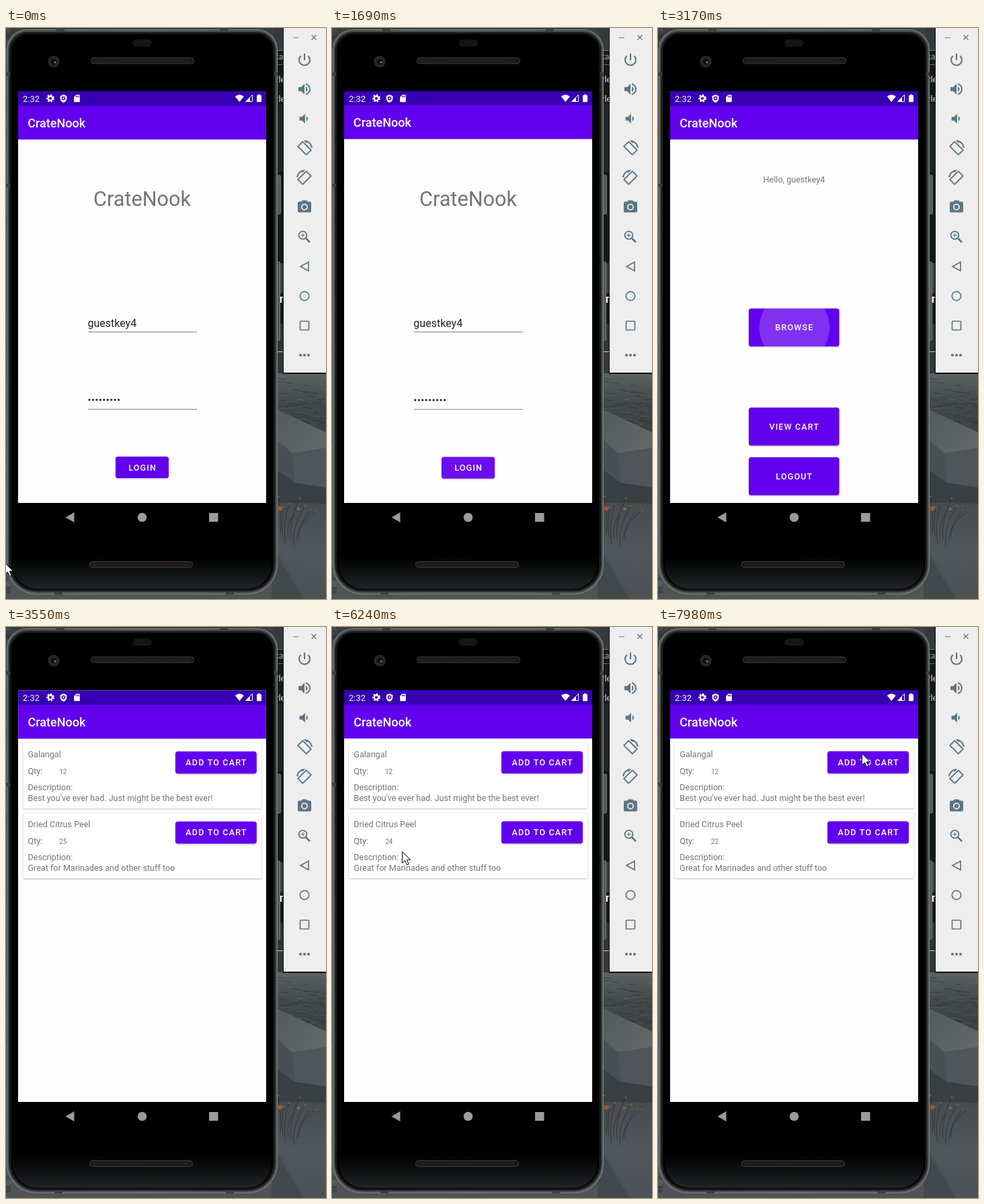
An HTML page with a canvas that plays this animation: 476 by 850 pixels, repeating every 8000 ms.

```html
<!DOCTYPE html>
<html lang="en">
<head>
<meta charset="utf-8">
<title>Phone shop demo</title>
<style>
html, body { margin: 0; width: 100%; height: 100%; overflow: hidden; background: #000; }
canvas { display: block; width: 476px; height: 850px; }
</style>
</head>
<body>
<canvas id="stage"></canvas>
<script>
const W = 476, H = 850, LOOP = 8000;
const APP = 'CrateNook', USER = 'guestkey4';
const PURPLE = '#6200ee', GREY = '#757575', TOOL = '#5c7685';
const SCREEN = { x: 18, y: 94, w: 369, h: 658 };
const dpr = window.devicePixelRatio || 1;

function setup(canvas) {
  canvas.width = W * dpr;
  canvas.height = H * dpr;
  const g = canvas.getContext('2d');
  g.scale(dpr, dpr);
  return g;
}
const stage = setup(document.getElementById('stage'));
const backdrop = document.createElement('canvas');
let c = setup(backdrop);

// ---- helpers ----
function rect(x, y, w, h, fill) {
  c.fillStyle = fill;
  c.fillRect(x, y, w, h);
}
function paint(fill, stroke, lw) {
  if (fill) { c.fillStyle = fill; c.fill(); }
  if (stroke) { c.strokeStyle = stroke; c.lineWidth = lw; c.stroke(); }
}
function round(x, y, w, h, r, fill, stroke, lw = 1) {
  c.beginPath();
  c.roundRect(x, y, w, h, r);
  paint(fill, stroke, lw);
}
function circle(x, y, r, fill, stroke, lw = 1) {
  c.beginPath();
  c.arc(x, y, r, 0, Math.PI * 2);
  paint(fill, stroke, lw);
}
function poly(points, fill, stroke, lw = 1) {
  c.beginPath();
  points.forEach(([x, y]) => c.lineTo(x, y));
  c.closePath();
  paint(fill, stroke, lw);
}
function line(x1, y1, x2, y2, stroke, lw = 1) {
  c.beginPath();
  c.moveTo(x1, y1);
  c.lineTo(x2, y2);
  paint(null, stroke, lw);
}
function text(str, x, y, size, fill, { weight = 400, align = 'left', spacing = 0 } = {}) {
  c.font = `${weight} ${size}px Roboto, sans-serif`;
  c.letterSpacing = spacing + 'px';
  c.textAlign = align;
  c.fillStyle = fill;
  c.fillText(str, x, y);
  c.letterSpacing = '0px';
}
function icon(path, x, y, size, fill, { flip = 1, bold = 0 } = {}) {
  const shape = new Path2D(path);
  c.save();
  c.translate(x, y);
  c.scale(size / 24 * flip, size / 24);
  c.translate(-12, -12);
  c.fillStyle = c.strokeStyle = fill;
  c.fill(shape, 'evenodd');
  if (bold) { c.lineWidth = bold; c.stroke(shape); }
  c.restore();
}
function blend(x1, y1, x2, y2, ...colors) {
  const g = c.createLinearGradient(x1, y1, x2, y2);
  colors.forEach((col, i) => g.addColorStop(i / (colors.length - 1), col));
  return g;
}
function randomizer(seed) {
  return () => (seed = (seed * 16807) % 2147483647) / 2147483647;
}
const clamp = v => Math.max(0, Math.min(1, v));
const smooth = v => v * v * (3 - 2 * v);

// ---- still parts ----
function drawScene() {
  const rnd = randomizer(41);
  rect(0, 0, W, H, blend(0, 0, 0, H, '#3a3e40', '#3e4345', '#464b4e', '#4e5457'));
  for (let i = 0; i < 70; i++) {
    rect(0, rnd() * H, 7, 2 + rnd() * 8, `rgba(${rnd() < .5 ? '15,18,20' : '130,138,142'},.15)`);
  }
  // dark window behind the phone
  rect(398, 0, 16, 484, '#15181a');
  rect(398, 0, 16, 33, '#34393b');
  rect(398, 33, 16, 1, '#777');
  rect(400, 54, 14, 1, '#666');
  rect(404, 114, 10, 100, '#202426');
  text('ka', 400, 47, 12, '#a0a3a5');
  text('rle', 401, 81, 13, '#d0d2d3');
  text('rle', 401, 110, 13, '#d0d2d3');
  rect(404, 350, 10, 45, '#3c4042');
  text('T', 405, 409, 13, '#fff', { weight: 700 });
  rect(402, 440, 12, 40, '#303436');
  rect(402, 481, 12, 1.5, '#b0b3b4');
  rect(402, 483, 12, 32, '#34383a');
  // water
  rect(395, 514, 81, 110, blend(0, 514, 0, 624, '#5c6164', '#464b4e', '#3b4043', '#43494c'));
  for (let i = 0; i < 60; i++) {
    const x = 396 + rnd() * 76, y = 518 + rnd() * 78, w = 6 + rnd() * 18;
    line(x, y, x + w, y + rnd() * 4 - 1, rnd() < .55 ? 'rgba(22,27,30,.3)' : 'rgba(130,137,140,.2)', 1.2);
  }
  // stone block
  rect(395, 630, 81, 220, blend(0, 630, 0, 850, '#3e4447', '#454b4e', '#50565a', '#4c5255'));
  poly([[395, 564], [476, 602], [476, 626], [425, 633], [395, 606]], blend(404, 570, 470, 630, '#54595c', '#63686b'));
  poly([[425, 633], [476, 625], [476, 684], [429, 677]], '#4f5558');
  poly([[395, 606], [425, 633], [429, 677], [395, 652]], '#494f52');
  poly([[395, 652], [429, 677], [476, 684], [476, 708], [395, 706]], '#393f42');
  poly([[395, 782], [406, 784], [446, 850], [395, 850]], '#42484b');
  line(404, 784, 444, 850, '#5c6265', 1);
  // dry plants
  for (let i = 0; i < 8; i++) {
    const x = 405 + i * 8, y = 692 + rnd() * 46, bx = 408 + i * 4, by = 772 - rnd() * 20;
    c.beginPath();
    c.moveTo(bx, by);
    c.quadraticCurveTo(bx - 6 + rnd() * 10, (y + by) / 2, x, y);
    paint(null, 'rgba(40,40,38,.7)', .9);
    circle(x, y, 1 + rnd(), '#70604c');
  }
  circle(408, 715, 3.5, '#a3552f');
  circle(435, 716, 2, '#8a6440');
}

function drawPhone() {
  round(403, 219, 5.5, 58, 2, '#53585a', '#8a8d8e', .7);
  round(402, 348, 5.5, 117, 2, '#53585a', '#8a8d8e', .7);
  round(1.5, 2.5, 402, 840, [30, 30, 44, 44], blend(0, 0, 404, 0, '#4b4f50', '#5b5f60', '#4b4f50'), '#7b8081', 1.2);
  round(4.5, 6, 396, 833, [27, 27, 41, 41], '#191b1b', '#2c2f30');
  round(7.5, 9, 390, 827, [25, 25, 38, 38], '#000');
  round(10, 770, 385, 65, [0, 0, 37, 37], blend(0, 785, 0, 836, 'rgba(30,31,32,0)', '#232526'));
  for (const y of [66, 232]) rect(1, y, 5, 5, '#3b3f40');
  rect(399, 66, 5, 5, '#3b3f40');
  for (const x of [75, 318]) rect(x, 2, 12, 4, '#3b3f40');
  for (const x of [72, 327]) rect(x, 839, 12, 4, '#3b3f40');
  round(189, 18, 27, 9, 4.5, '#141516', '#1d1f20');
  for (const [x, y] of [[126, 44], [124, 794]]) {
    round(x + .5, y + .5, 153, 8.5, 4, '#191713', '#454340');
    for (let i = 5; i < 149; i += 3) rect(x + i, y + 3, 1.4, 4, '#2b2822');
  }
  circle(71, 50, 8.7, '#242627');
  circle(71, 50, 5.2, '#0e1012', '#303336', 1);
  circle(73, 51, 1.5, '#7d8790');
}

const VOL_UP = 'M3 9v6h4l5 5V4L7 9H3zm13.5 3c0-1.77-1.02-3.29-2.5-4.03v8.05c1.48-.73 2.5-2.25 2.5-4.02zM14 3.23v2.06c2.89.86 5 3.54 5 6.71s-2.11 5.85-5 6.71v2.06c4.01-.91 7-4.49 7-8.77s-2.99-7.86-7-8.77z';
const VOL_DOWN = 'M18.5 12c0-1.77-1.02-3.29-2.5-4.03v8.05c1.48-.73 2.5-2.25 2.5-4.02zM5 9v6h4l5 5V4L9 9H5z';
const ROTATE = 'M16.48 2.52c3.27 1.55 5.61 4.72 5.97 8.48h1.5C23.44 4.84 18.29 0 12 0l-.66.03 3.81 3.81 1.33-1.32zm-6.25-.77c-.59-.59-1.54-.59-2.12 0L1.75 8.11c-.59.59-.59 1.54 0 2.12l12.02 12.02c.59.59 1.54.59 2.12 0l6.36-6.36c.59-.59.59-1.54 0-2.12L10.23 1.75zm4.6 19.44L2.81 9.17l6.36-6.36 12.02 12.02-6.36 6.36z';
const CAMERA = 'M9 2L7.17 4H4c-1.1 0-2 .9-2 2v12c0 1.1.9 2 2 2h16c1.1 0 2-.9 2-2V6c0-1.1-.9-2-2-2h-3.17L15 2H9zm3 15a5 5 0 1 1 0-10 5 5 0 0 1 0 10z';
const SHIELD = 'M12 1L3 5v6c0 5.55 3.84 10.74 9 12 5.16-1.26 9-6.45 9-12V5l-9-4z';
const SD_CARD = 'M18 2h-8L4 8v12c0 1.1.9 2 2 2h12c1.1 0 2-.9 2-2V4c0-1.1-.9-2-2-2zM9 5h2v4H9zM12.5 5h2v4h-2zM16 5h2v4h-2z';

function drawToolbar() {
  rect(412, 0, 64, 515, '#111');
  rect(413, 0, 63, 513, '#eee');
  line(427, 14.5, 435, 14.5, '#7d8a91', 1.2);
  line(454.5, 10.5, 461.5, 17.5, '#66767e', 1.3);
  line(461.5, 10.5, 454.5, 17.5, '#66767e', 1.3);
  const x = 444;
  c.beginPath();
  c.arc(x, 47.5, 8, -Math.PI * .27, Math.PI * 1.27);
  paint(null, TOOL, 2.1);
  line(x, 38, x, 48, TOOL, 2.1);
  icon(VOL_UP, x, 91, 24, TOOL);
  icon(VOL_DOWN, x - 1, 135, 22, TOOL);
  icon(ROTATE, x, 179, 23, TOOL, { bold: .7 });
  icon(ROTATE, x, 223, 23, TOOL, { flip: -1, bold: .7 });
  icon(CAMERA, x, 266.5, 24, TOOL);
  circle(x, 266.5, 3.2, TOOL);
  circle(441.5, 308.5, 5.9, null, TOOL, 1.9);
  line(446, 313, 452, 319, TOOL, 2.6);
  line(438.5, 308.5, 444.5, 308.5, TOOL, 1.1);
  line(441.5, 305.5, 441.5, 311.5, TOOL, 1.1);
  poly([[438, 355], [450, 348.5], [450, 361.5]], null, TOOL, 1.7);
  circle(x, 399, 6.7, null, TOOL, 1.7);
  round(437.5, 436.5, 13, 13, 1, null, TOOL, 1.7);
  for (const dx of [-6, 0, 6]) circle(x + dx, 487, 2.1, TOOL);
}

drawScene();
drawPhone();
drawToolbar();
c = stage;

// ---- app pages ----
const CLICKS = [
  { at: 1500, x: 203, y: 655 },
  { at: 3120, x: 203, y: 446 },
  { at: 4860, x: 308, y: 306 },
  { at: 6930, x: 306, y: 308 },
  { at: 7250, x: 306, y: 308 }
];

function button(label, x, y, w, h, t) {
  c.save();
  c.shadowColor = 'rgba(0,0,0,.26)';
  c.shadowBlur = 2.4 * dpr;
  c.shadowOffsetY = 1.2 * dpr;
  round(x, y, w, h, 3.6, PURPLE);
  c.restore();
  for (const k of CLICKS) {
    const age = t - k.at;
    const inside = k.x > x && k.x < x + w && k.y > y && k.y < y + h;
    if (!inside || age < 0 || age > 250) continue;
    c.save();
    c.beginPath();
    c.roundRect(x, y, w, h, 3.6);
    c.clip();
    circle(k.x, k.y, 12 + w * clamp(age / 170), `rgba(255,255,255,${.24 * (1 - age / 250)})`);
    c.restore();
  }
  text(label, x + w / 2 + .6, y + h / 2 + 4.5, 12.6, '#fff', { weight: 500, align: 'center', spacing: 1.12 });
}

function loginPage(t) {
  text(APP, 202.5, 265, 30.6, GREY, { align: 'center' });
  text(USER, 121.5, 444.5, 16, '#202020');
  line(122, 452.5, 284, 452.5, '#858585');
  for (let i = 0; i < 9; i++) circle(124 + i * 5.45, 553.5, 1.6, '#202020');
  line(122, 567.5, 284, 567.5, '#858585');
  button('LOGIN', 163, 638, 79, 32, t);
}

function homePage(t) {
  text('Hello, ' + USER, 202.5, 230, 12.6, GREY, { align: 'center' });
  button('BROWSE', 135, 417.5, 134.5, 56.5, t);
  button('VIEW CART', 135, 565, 134.5, 56.5, t);
  button('LOGOUT', 135, 639, 134.5, 56.5, t);
}

function card(y, name, qty, about, t) {
  c.save();
  c.shadowColor = 'rgba(0,0,0,.3)';
  c.shadowBlur = 2.5 * dpr;
  c.shadowOffsetY = .8 * dpr;
  round(25, y, 355, 97.5, 2, '#fff');
  c.restore();
  text(name, 32.3, y + 21.5, 12.6, GREY);
  text('Qty:', 32.3, y + 46.5, 12.6, GREY);
  text(qty, 79, y + 46.5, 10, GREY);
  text('Description:', 32.3, y + 70.5, 12.6, GREY);
  text(about, 32.3, y + 86.5, 12.6, GREY);
  button('ADD TO CART', 252, y + 12.5, 121, 33, t);
}

function listPage(t) {
  const sold = CLICKS.filter((k, i) => i > 1 && t > k.at + 90).length;
  card(172.5, 'Galangal', 12, "Best you've ever had. Just might be the best ever!", t);
  card(276.8, 'Dried Citrus Peel', 25 - sold, 'Great for Marinades and other stuff too', t);
}

function drawWindow(page, t, scale, alpha = 1) {
  const { x, y, w, h } = SCREEN, cx = x + w / 2, cy = y + h / 2;
  c.save();
  c.globalAlpha = alpha;
  c.translate(cx, cy);
  c.scale(scale, scale);
  c.translate(-cx, -cy);
  rect(x, y, w, h, '#fefefe');
  rect(x, y, w, 22, '#3700b3');
  rect(x, 115.5, w, 50.5, PURPLE);
  text(APP, 32.3, 147.5, 18, '#fff', { weight: 500 });
  page(t);
  c.restore();
}

const PAGES = [
  { page: loginPage, at: -1000 },
  { page: homePage, at: 1675 },
  { page: listPage, at: 3270 }
];

function drawScreen(t) {
  const { x, y, w, h } = SCREEN;
  let i = PAGES.length - 1;
  while (t < PAGES[i].at) i--;
  const age = t - PAGES[i].at;
  const p = 1 - (1 - clamp(age / 400)) ** 4;
  c.save();
  c.beginPath();
  c.rect(x, y, w, h);
  c.clip();
  rect(x, y, w, h, '#000');
  if (i && age < 400) drawWindow(PAGES[i - 1].page, t, 1 + .05 * clamp(p - .1));
  const alpha = i ? clamp((age - 50) / 50) : 1;
  if (alpha) drawWindow(PAGES[i].page, t, .85 + .15 * p, alpha);
  rect(x, 707, w, 45, '#000');
  c.restore();
  drawSystemBars();
}

function drawSystemBars() {
  text('2:32', 25, 109.7, 13, '#f4f0fc');
  c.setLineDash([2.4, 2.1]);
  circle(66, 104.7, 4.9, null, '#fff', 2);
  c.setLineDash([]);
  circle(66, 104.7, 3.2, null, '#fff', 2.3);
  icon(SHIELD, 85.5, 105, 13, '#fff');
  circle(85.5, 104.6, 2.9, '#3700b3');
  circle(85.5, 104.6, 1.4, '#fff');
  icon(SD_CARD, 105.5, 104.8, 13, '#fff');
  c.beginPath();
  c.moveTo(347.3, 110);
  c.lineTo(340.8, 102);
  c.quadraticCurveTo(347.3, 96.6, 353.8, 102);
  paint('#fff');
  poly([[356.5, 109.5], [366.5, 99.5], [366.5, 109.5]], null, '#fff', 1);
  poly([[356.5, 109.5], [363, 103], [363, 109.5]], '#fff');
  round(373, 100, 7, 10.2, 1, '#fff');
  rect(375, 98.8, 3, 2, '#fff');
  poly([[88.5, 728.5], [101.5, 721], [101.5, 736]], '#9b9b9b');
  circle(202.5, 728.5, 6.8, '#9b9b9b');
  rect(302, 722, 13.5, 13, '#9b9b9b');
}

// ---- pointer: time, x, y ----
const TRACK = [
  [0, -2, 796], [150, -16, 800], [3750, -16, 800], [4550, 308, 306], [5100, 308, 306],
  [5800, 104, 334], [6300, 104, 334], [6850, 306, 308], [7400, 306, 308], [7900, 303, 188], [LOOP, 303, 188]
];
const ARROW = [[0, 0], [0, 17], [4, 13.3], [6.8, 19.6], [9.6, 18.4], [6.9, 12.3], [12, 12.1]];

function drawPointer(t) {
  const i = TRACK.findIndex(k => k[0] > t) - 1;
  const [t0, x0, y0] = TRACK[i], [t1, x1, y1] = TRACK[i + 1];
  const p = smooth((t - t0) / (t1 - t0));
  const x = x0 + (x1 - x0) * p, y = y0 + (y1 - y0) * p;
  poly(ARROW.map(([dx, dy]) => [x + dx + .5, y + dy + .5]), '#fff', '#000', 1);
}

const start = performance.now();
function frame() {
  const t = (performance.now() - start) % LOOP;
  c.drawImage(backdrop, 0, 0, W, H);
  drawScreen(t);
  drawPointer(t);
  requestAnimationFrame(frame);
}
frame();
</script>
</body>
</html>
```
